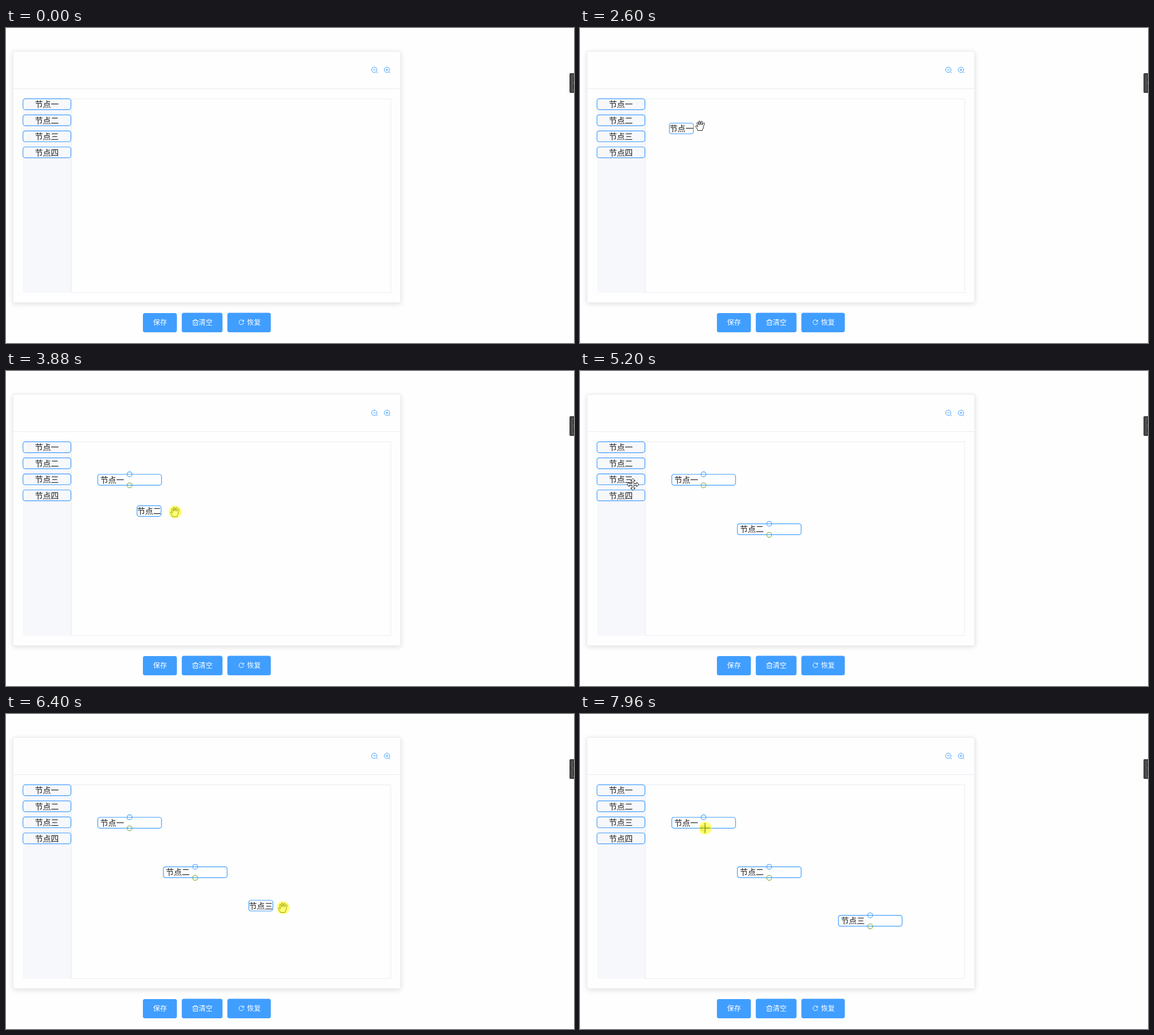
Write an HTML page that moves like this. It is 1004 by 558 pixels and loops after 8000 ms.

```html
<!DOCTYPE html>
<html lang="zh-CN">
<head>
<meta charset="utf-8">
<title>节点编辑</title>
<style>
html, body { margin: 0; width: 100%; height: 100%; overflow: hidden; background: #fefefe; }
svg { position: absolute; left: 0; top: 0; width: 1004px; height: 558px; }
.card { position: absolute; left: 12px; top: 41px; width: 684px; height: 444px; border: 1px solid #e8ebf1;
  border-radius: 3px; background: #fefefe; box-shadow: 0 2px 10px rgba(0, 0, 0, .12); }
text { font: 14px "Noto Sans CJK SC", "Noto Sans CJK JP", sans-serif; fill: #1d1d1d; }
.mid { text-anchor: middle; }
.button text { font-size: 12.2px; fill: #fff; }
.button rect { fill: #409eff; }
.button path { fill: none; stroke: #fff; stroke-width: 1; }
.box { fill: none; stroke: #409eff; stroke-width: 1.2; }
.zoom { fill: none; stroke: #409eff; stroke-width: 1; }
.port { fill: none; stroke: #409eff; stroke-width: 1.1; }
.out { stroke: #70ad35; }
.cursor { stroke: #222; stroke-width: 1; stroke-linejoin: round; fill: #fff; }
#halo { fill: #ff0; opacity: .55; }
</style>
</head>
<body>
<div class="card"></div>
<svg viewBox="0 0 1004 558">
  <path d="M13 107.5H698" stroke="#e8ebf1"/>
  <path d="M30 125H116V469H30Z" fill="#f7f8fb"/>
  <path d="M115.5 125.5H680V468.5H115.5Z" fill="none" stroke="#e9ecf1"/>
  <g class="zoom">
    <path d="M654.5 77.5L657 80M649 74H653.4"/><circle cx="651" cy="74" r="4.7"/>
    <path d="M676.7 77.5L679.2 80M671.1 74H675.7M673.4 71.7V76.3"/><circle cx="673.4" cy="74" r="4.7"/>
  </g>
  <g class="button">
    <rect x="242" y="505" width="60" height="34" rx="3.5"/>
    <rect x="310.7" y="504.6" width="72" height="34.4" rx="3.5"/>
    <rect x="391.3" y="504.6" width="76.7" height="34.4" rx="3.5"/>
    <path d="M329.5 518.5H340M333 518V516.5H336.7V518M331 518.5V526.5H338.7V518.5M333.5 521V524.5M336.2 521V524.5"/>
    <path d="M419.8 519.4A4.2 4.2 0 1 0 420.2 521.8M420.1 516.8V519.7H417.2"/>
    <text class="mid" x="272.2" y="526">保存</text>
    <text class="mid" x="353" y="526">清空</text>
    <text class="mid" x="438.2" y="526">恢复</text>
  </g>
  <path d="M1004 80H998Q996 80 996 82V113Q996 115 998 115H1004Z" fill="#424242"/>
  <path d="M1004 84.5H1000.5V95.5H1004M1004 98.5H1000.5V110.5H1004" fill="none" stroke="#666"/>
  <g id="items"></g>
  <g id="nodes"></g>
  <g id="ghost"><rect class="box" width="42.5" height="19" rx="4"/><text x=".4" y="14.8"></text></g>
  <g id="pointer">
    <path id="arrow" class="cursor" d="M0 0V16.5L3.8 12.9L6.4 18.7L8.9 17.6L6.4 12H11.8Z"/>
    <path id="hand" class="cursor" d="M-4.5 8.5C-5 6-7 3.5-8 1.8C-8.6.4-6.8-.6-5.6.8L-4.4 2.2L-5.8-4.4C-6-6-4.2-6.5-3.6-5L-2.2-1.2L-2.6-7C-2.6-8.8-.6-8.9-.4-7.2L.1-1.5L1.6-7.1C2-8.6 4-8.2 3.7-6.5L2.9-1L5.3-4.6C6.3-6 8-5 7.3-3.3C6.2-.5 6.1 2 5.4 4C4.9 5.5 4 6.5 3.8 8.5Z"/>
    <path id="move" class="cursor" fill-opacity=".65" d="M0-10.7L4-6.5H1.5V-1.5H6.5V-4L10.7 0L6.5 4V1.5H1.5V6.5H4L0 10.7L-4 6.5H-1.5V1.5H-6.5V4L-10.7 0L-6.5-4V-1.5H-1.5V-6.5H-4Z"/>
    <path id="cross" class="cursor" style="stroke-width:1.5" d="M-9 0H9M0-9V9"/>
    <circle id="halo" cx=".3" cy=".3" r="11.3"/>
  </g>
</svg>
<script>
const LOOP = 8000, STEP = 108;
const $ = id => document.getElementById(id);
const place = (el, x, y) => el.setAttribute('transform', `translate(${x} ${y})`);
const show = (el, on) => { el.style.display = on ? '' : 'none'; };

const names = ['节点一', '节点二', '节点三', '节点四'];
$('items').innerHTML = names.map((name, i) => {
  const y = 125.4 + i * 28.45;
  return `<rect class="box" x="30" y="${y}" width="84.7" height="19.2" rx="4"/>
    <text class="mid" x="72.3" y="${y + 14.8}">${name}</text>`;
}).join('');

// dx, dy: grip inside the ghost; x, y: corner of the dropped node
const drags = [
  { press: 1490, start: 1600, release: 2400, dx: 65.5, dy: 11, x: 162.2, y: 183 },
  { press: 3350, start: 3350, release: 4310, dx: 67, dy: 11, x: 278.2, y: 270.6 },
  { press: 5310, start: 5310, release: 6830, dx: 60.3, dy: 13, x: 456.7, y: 356.6 }
];
const dropDelay = 310, portPress = 7960;

$('nodes').innerHTML = drags.map((d, i) => `<g transform="translate(${d.x} ${d.y})">
  <rect class="box" width="112.7" height="19.3" rx="4"/>
  <text x="4.5" y="14.8">${names[i]}</text>
  <circle class="port" cx="56.2" r="4.4"/>
  <circle class="port out" cx="56.2" cy="19.6" r="4.4"/></g>`).join('');
const nodes = [...$('nodes').children];
const ghostText = $('ghost').querySelector('text');

// start, end, x, y: the pointer rests between legs
const legs = [
  [0, 830, 150, 155], [830, 1270, 87, 133],
  [1490, 1830, 223.5, 179.5], [2300, 2600, 212.5, 173], [2600, 3350, 97, 163],
  [3350, 4100, 330, 263], [4200, 5200, 93.5, 201], [5200, 5310, 90.5, 195],
  [5310, 6400, 489.5, 343], [6420, 6630, 508.5, 348.5], [6720, 7600, 221, 202]
];
const easeOut = u => 1 - (1 - u) ** 1.6;

function pointerAt(t) {
  let x = 952, y = 631;
  for (const [start, end, toX, toY] of legs) {
    if (t < start) break;
    const steps = Math.round((end - start) / STEP);
    const done = Math.floor((t - start) / (end - start) * steps + .1);
    const part = easeOut(Math.min(1, done / steps));
    x += (toX - x) * part;
    y += (toY - y) * part;
  }
  return [x, y];
}

function cursorKind(x, y, dragging) {
  if (Math.hypot(x - 218.4, y - 202.6) < 5) return 'cross';
  if (dragging || (x > 116 && x < 680 && y > 125 && y < 469)) return 'hand';
  return x > 30 && x <= 116 && y > 120 && y < 231 ? 'move' : 'arrow';
}

function draw(t) {
  const [x, y] = pointerAt(t);
  const active = drags.findIndex(d => t >= d.start && t < d.release + dropDelay);
  const drag = drags[active];
  show($('ghost'), drag);
  if (drag) {
    const [gx, gy] = pointerAt(Math.min(t, drag.release - 30));
    place($('ghost'), gx - drag.dx, gy - drag.dy);
    ghostText.textContent = names[active];
  }
  nodes.forEach((node, i) => show(node, t >= drags[i].release + dropDelay));

  const kind = cursorKind(x, y, drag && t < drag.release);
  place($('pointer'), x, y);
  for (const id of ['arrow', 'hand', 'move', 'cross']) show($(id), id === kind);
  show($('halo'), t >= portPress || drags.some(d => t >= d.press && t < d.release));
}

const began = performance.now();
function tick() {
  draw((performance.now() - began) % LOOP);
  requestAnimationFrame(tick);
}
tick();
</script>
</body>
</html>
```
